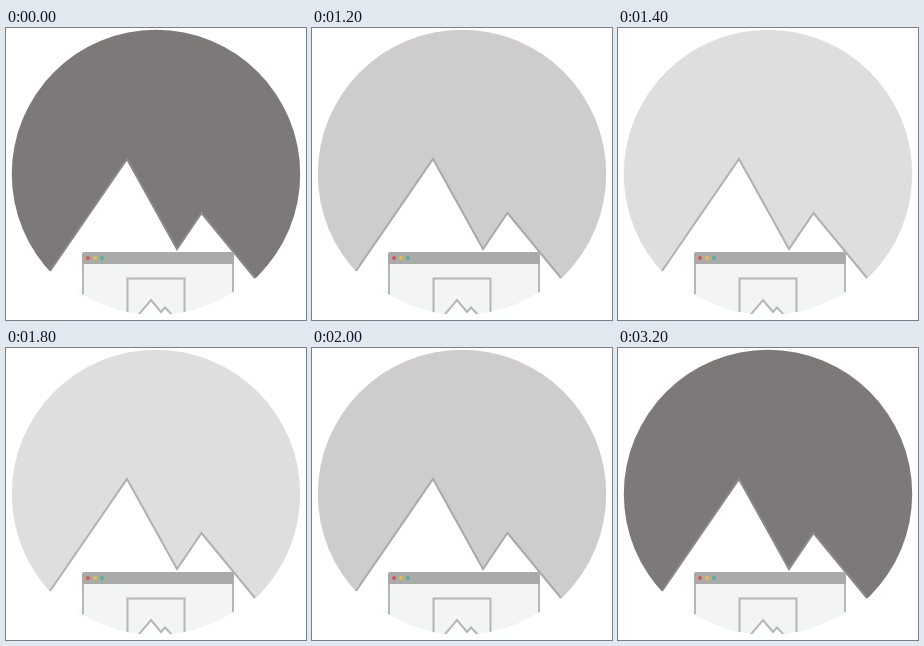
Recreate the animation shown at these times as an HTML page. Size 300 by 292 pixels, loop 3400 ms.

```html
<!DOCTYPE html>
<html lang="en">
<head>
<meta charset="utf-8">
<title>Mountain sky</title>
<style>
  html, body { margin: 0; width: 100%; height: 100%; overflow: hidden; background: #fff; }
  svg { display: block; width: 300px; height: 292px; }
  .line { fill: none; stroke: #b4b7b7; stroke-width: 2; }
  .pale { fill: #f3f5f5; }
</style>
</head>
<body>
<svg viewBox="0 0 300 292">
  <defs>
    <clipPath id="disc"><circle cx="150" cy="146" r="144.2"/></clipPath>
    <clipPath id="base"><path d="M0 0H300V286H0Z"/></clipPath>
    <clipPath id="bowl" clip-path="url(#base)"><circle cx="150" cy="146" r="141"/></clipPath>
  </defs>

  <circle id="sky" cx="150" cy="146" r="144.2" fill="#7d7979"/>
  <path d="M0 307 L121 131 L171 221 L195.500 185 L300 311 Z" fill="#fff"/>
  <path d="M20 292 H280 V311 H20 Z" fill="#fff"/>
  <g clip-path="url(#disc)">
    <path id="ridge" class="line" d="M44 243 L121 131 L171 221 L195.500 185 L249 250"/>
  </g>

  <g clip-path="url(#bowl)">
    <path class="pale" d="M66 260 L76 263.500 V268 Z"/>
    <rect class="pale" x="77" y="225" width="150" height="70"/>
    <path class="line" d="M77 295 V230 M227 295 V230"/>
    <path d="M76 236 V226 Q76 224 78 224 H226 Q228 224 228 226 V236 Z" fill="#a9abab"/>
    <circle cx="82" cy="230" r="2" fill="#e5524a"/>
    <circle cx="89" cy="230" r="2" fill="#efba3a"/>
    <circle cx="96" cy="230" r="2" fill="#55b48c"/>
    <path class="line" d="M121.500 295 V250.500 H178.500 V295"/>
    <path class="line" d="M129 291 L145 272 L155 284 L159 279.500 L169 290" style="fill:#fff"/>
  </g>
</svg>
<script>
  const HOLD = 200, COUNT = 17, PEAK = 8;
  const skyStops = [[0, [125, 121, 121]], [6, [206, 204, 205]], [7, [222, 222, 222]], [8, [243, 245, 245]]];
  const ridgeStops = [[0, [139, 136, 136]], [6, [171, 170, 170]], [8, [180, 183, 183]]];

  function tone(stops, level) {
    const i = Math.max(1, stops.findIndex(([at]) => at >= level));
    const [a, from] = stops[i - 1], [b, to] = stops[i];
    const mix = (level - a) / (b - a);
    return `rgb(${from.map((v, n) => Math.round(v + (to[n] - v) * mix)).join(",")})`;
  }

  // Brightness climbs to the peak and falls back in held steps.
  function pulse(id, property, stops) {
    const frames = [];
    for (let n = 0; n <= COUNT; n++) {
      const level = n === COUNT ? 0 : PEAK - Math.abs(n - PEAK);
      frames.push({ offset: n / COUNT, [property]: tone(stops, level), easing: "step-end" });
    }
    const run = document.getElementById(id).animate(frames, { duration: HOLD * COUNT, iterations: Infinity });
    run.startTime = 0;
  }

  pulse("sky", "fill", skyStops);
  pulse("ridge", "stroke", ridgeStops);
</script>
</body>
</html>
```
